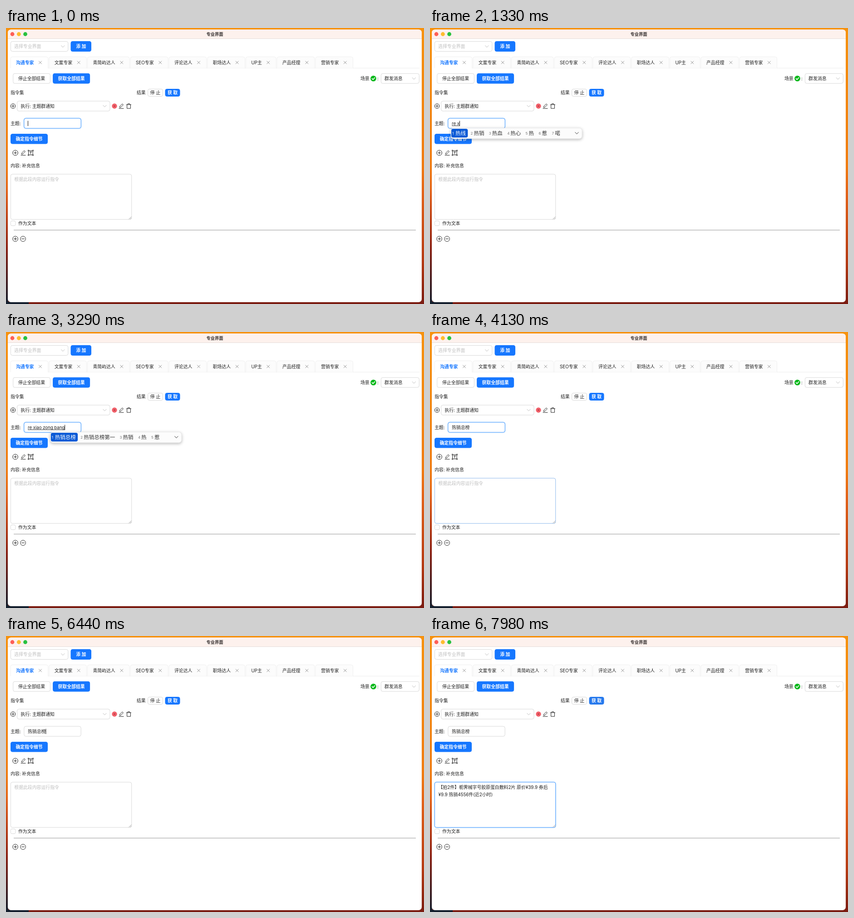
Recreate the animation shown at these times as an HTML page. Size 921x608 px, loop 8000 ms.

```html
<!DOCTYPE html>
<html lang="zh-CN">
<head>
<meta charset="utf-8">
<style>
  html, body { margin: 0; width: 100%; height: 100%; overflow: hidden; }
  svg { display: block; width: 921px; height: 608px; }
  text {
    font: 9.87px Inter, "Noto Sans CJK SC", "Noto Sans CJK", sans-serif;
    fill: #1f1f1f; white-space: pre; text-spacing-trim: space-all;
  }
  .bold { font-weight: 700; }
  .hint { fill: #bfbfbf; }
  .icon { fill: none; stroke: #222; stroke-width: 1; stroke-linecap: round; stroke-linejoin: round; }
</style>
</head>
<body>
<svg viewBox="0 0 921 608">
  <defs>
    <linearGradient id="wall" x2="0" y2="1">
      <stop offset="0" stop-color="#f6920f"/><stop offset=".5" stop-color="#f07c12"/>
      <stop offset=".6" stop-color="#e2621a"/><stop offset=".85" stop-color="#b43a14"/>
      <stop offset="1" stop-color="#7a1c12"/>
    </linearGradient>
    <linearGradient id="shade" x2="0" y2="1">
      <stop offset=".58" stop-color="#c33a14" stop-opacity="0"/>
      <stop offset=".8" stop-color="#8a2216"/><stop offset="1" stop-color="#15202e"/>
    </linearGradient>
    <filter id="shadow" x="-10%" y="-60%" width="120%" height="240%">
      <feDropShadow dx="0" dy="2" stdDeviation="3" flood-opacity=".3"/>
    </filter>
  </defs>
  <g id="page"></g>
  <g id="live"></g>
</svg>
<script>
const LOOP = 8000, TICK = 70, BLUE = '#1677ff', LINE = '#d9d9d9';
const $ = id => document.getElementById(id);

const box = (x, y, w, h, fill = '#fff', stroke = 'none', r = 4, extra = '') =>
  `<rect x="${x}" y="${y}" width="${w}" height="${h}" rx="${r}" fill="${fill}" stroke="${stroke}" ${extra}/>`;
const label = (x, middle, text, cls = '', extra = '') =>
  `<text x="${x}" y="${middle + 3.6}" class="${cls}" ${extra}>${text}</text>`;
const dot = (x, y, r, fill, stroke = 'none') =>
  `<circle cx="${x}" cy="${y}" r="${r}" fill="${fill}" stroke="${stroke}"/>`;
const icon = (x, y, d, extra = '') =>
  `<path class="icon" transform="translate(${x} ${y})" d="${d}" ${extra}/>`;
const chevron = (x, y, color = '#bfbfbf') => icon(x, y, 'M-3.6-1.8L0 2L3.6-1.8', `style="stroke:${color}"`);
const button = (x, y, w, h, text, primary) =>
  box(x, y, w, h, primary ? BLUE : '#fff', primary ? BLUE : LINE, 3.5) +
  label(x + w / 2, y + h / 2, text, primary ? 'bold' : '',
    `text-anchor="middle"${primary ? ' style="fill:#fff"' : ''}`);
const select = (x, y, w, h, text, cls) =>
  box(x, y, w, h, '#fff', LINE) + label(x + 7.8, y + h / 2, text, cls) + chevron(x + w - 11.5, y + h / 2);
const ring = (x, y, r, minus) =>
  dot(x, y, r, 'none', '#222') + icon(x, y, 'M-3 0H3' + (minus ? '' : 'M0-3V3'));
const pencil = (x, y) => icon(x, y, 'M-5 5.3H5M-3.6 2.7L-3 .2L2.2-5L4.4-2.8L-.8 2.3Z');

function tabs() {
  const names = ['沟通专家', '文案专家', '青简屿达人', 'SEO专家', '评论达人', '职场达人', 'UP主', '产品经理', '营销专家'];
  const lefts = [10, 94.7, 179.4, 274, 359, 443.7, 528.4, 597, 682, 766.5];
  return '<path d="M10 88.3H911" stroke="#eee"/>' + names.map((name, i) => {
    const x = lefts[i], right = lefts[i + 1] - 2, active = i === 0;
    return `<path d="M${x} 88.3V67.5q0-4 4-4H${right - 4}q4 0 4 4V88.3" fill="${active ? '#fff' : '#fcfcfc'}" stroke="#f0f0f0"/>` +
      (active ? `<path d="M${x + .5} 88.3H${right - .5}" stroke="#fff" stroke-width="1.4"/>` : '') +
      label(x + 12, 76, name, active ? 'bold' : '', active ? `style="fill:${BLUE}"` : '') +
      icon(right - 17.2, 76, 'M-3-3L3 3M3-3L-3 3', 'style="stroke:#888;stroke-width:.9"');
  }).join('');
}

$('page').innerHTML =
  box(0, 0, 921, 608, 'url(#wall)', 'none', 0) + box(0, 0, 5, 608, 'url(#shade)', 'none', 0) +
  box(0, 603, 50, 5, '#15202e', 'none', 0) +
  box(4, 3.5, 912, 600.5, '#fff', 'none', 7) +
  '<path id="bar" d="M4 23.5V10.5q0-7 7-7H909q7 0 7 7V23.5Z"/>' +
  '<path d="M4 23.5H916" stroke="#e6dcd9"/>' +
  [14, 28.3, 42.5].map(x => `<circle class="light" cx="${x}" cy="13.5" r="4.4"/>`).join('') +
  label(460, 13.5, '专业界面', 'bold', 'id="title" text-anchor="middle" style="font-size:9.3px"') +
  select(10.3, 29.5, 126.5, 22, '选择专业界面', 'hint') +
  button(143, 29.5, 44.5, 22, '添 加', true) + tabs() +
  button(15.7, 100.3, 81.6, 21.8, '停止全部结果') + button(103.6, 100.3, 81, 21.8, '获取全部结果', true) +
  label(781, 111, '场景') + dot(809.5, 111.2, 6.3, '#0ab81c') +
  icon(809.5, 111.2, 'M-3 .2L-.8 2.4L3.2-1.9', 'style="stroke:#fff;stroke-width:1.6"') + label(818, 111, ':') +
  select(826.3, 100.3, 84, 21.8, '群发消息', '') +
  label(10, 142, '指令集') + label(288, 142, '结果') +
  button(312.5, 134.5, 33, 16, '停 止') + `<g id="fetch">${button(351, 134.5, 32, 16, '获 取', true)}</g>` +
  ring(15.5, 172, 5.2) + select(24.5, 161, 204.5, 22, '执行: 主题群通知', '') +
  dot(239, 172, 5.7, '#f2616b') + icon(239, 172, 'M-1.7-1.7L1.7 1.7M1.7-1.7L-1.7 1.7', 'style="stroke:#a8323c"') +
  pencil(254, 172) +
  icon(270.5, 172, 'M-5-3.2H5M-2-3.4V-5.2H2V-3.4M-3.9-3V5.2H3.9V-3') +
  label(10, 210, '主题:') + button(10.5, 233.5, 81, 21.5, '确定指令细节', true) +
  ring(20.5, 275, 5.8) + pencil(38, 275) +
  icon(54.5, 275, 'M-4.5-4.5H4.5V4.5H-4.5ZM-2.2-2H2.2M0-2V2.6') +
  [-5, 5].map(x => [-5, 5].map(y => box(53.5 + x, 274 + y, 2, 2, '#fff', '#222', 0, 'stroke-width=".8"')).join('')).join('') +
  label(10, 303, '内容: 补充信息') +
  box(10.3, 425, 10.5, 10.5, '#fff', LINE, 2.8) + label(27, 430, '作为文本') +
  '<path d="M17 445.2H903" stroke="#b8b8b8" stroke-width="1.4"/>' +
  ring(20.5, 464.5, 5.8) + ring(37.5, 464.5, 5.8, true);

const field = (id, x, y, w, h) =>
  box(x - 1, y - 1, w + 2, h + 2, 'none', '#0591ff', 5, `id="${id}Glow" stroke-width="1.6"`) +
  box(x, y, w, h, '#fff', LINE, 4, `id="${id}"`);

$('live').innerHTML =
  field('topic', 39.8, 199, 125.4, 22) + label(48, 210, '', '', 'id="typed"') +
  '<path id="underline" stroke="#222" stroke-width=".9"/>' +
  field('area', 10.3, 322, 266.4, 99.7) + icon(274, 419, 'M-3 2L2-3M0 2L2 0', 'style="stroke:#777;stroke-width:.7"') +
  label(18.3, 333, '根据此段内容运行指令', 'hint', 'id="hint"') +
  `<g id="pasted">${label(18.5, 333, '【拍2件】栀霁械字号胶原蛋白敷料2片 原价¥39.9 券后')}${label(18.5, 349, '¥9.9 热销4556件(近2小时)')}</g>` +
  '<path id="caret" stroke="#111" stroke-width="1"/><g id="popup"></g>';

// start time, composed pinyin, left edge of the candidate window, candidates
const typing = [
  [210, 'r', 97.5, '人 让 如 日 然 热 入'],
  [560, 're', 43, '热 惹 喏 若 热爱 热点'],
  [980, 're', 46.3, '热 惹 喏 若 热爱 热点'],
  [1120, 're', 40, '热 惹 喏 若 热爱 热点'],
  [1330, 're x', 46, '热线 热销 热血 热心 热 惹 喏'],
  [1470, 're xi', 50, '热吸 热西 热系 热 惹 喏'],
  [1610, 're xia', 57, '热夏 热下 热 惹 喏'],
  [1680, 're xiao', 61.8, '热销 热孝 惹笑 热效应 热 惹 喏'],
  [2520, 're xiao z', 70, '热销中 热销 热 惹 喏'],
  [2590, 're xiao zo', 78, '热销中 热销 热 惹 喏'],
  [2730, 're xiao zon', 84, '热销中 热销总 热销 热 惹'],
  [2800, 're xiao zong', 84, '热销总 热销 热孝 热 惹'],
  [3010, 're xiao zong b', 90, '热销总部 热销总榜 热销 热 惹'],
  [3080, 're xiao zong ba', 97.8, '热销总把 热销总 热销 热 惹'],
  [3220, 're xiao zong ban', 97.8, '热销总办 热销总 热销 热 惹'],
  [3290, 're xiao zong bang', 97.8, '热销总榜 热销总榜第一 热销 热 惹'],
  [3570, '', 0, ''],
];

function popup(left, words) {
  if (!words) return '';
  let x = left + 3;
  const items = words.split(' ').map((word, i) => {
    const width = 11.5 * word.length, first = i === 0, color = first ? '#fff' : '#333';
    const item = (first ? box(x - 2, 222, width + 13.3, 19.3, '#0a5ad6') : '') +
      label(x, 231.6, i + 1, '', `style="font-size:8px;fill:${first ? '#fff' : '#777'}"`) +
      label(x + 7, 232, word, '', `style="font-size:11.5px;fill:${color}"`);
    x += width + 17.4;
    return item;
  });
  return box(left, 220.2, 289, 23.6, '#fcfcfc', '#d8d8d8', 6, 'filter="url(#shadow)" stroke-width=".6"') +
    items.join('') + chevron(left + 277.5, 231.5, '#333');
}

const ramp = (t, start, span = 210) => Math.max(0, Math.min(1, (t - start) / span));
const mix = (a, b, k) => `rgb(${a.map((v, i) => Math.round(v + (b[i] - v) * k))})`;
const set = (id, name, value) => $(id).setAttribute(name, value);
const show = (id, on) => $(id).style.display = on ? '' : 'none';
const within = (t, ...spans) => spans.some(([from, to]) => t >= from && t < to);
const GREY = [217, 217, 217], FOCUS = [64, 150, 255], PRIMARY = [22, 119, 255], PRESSED = [9, 88, 217];

function focusField(id, border, glow) {
  set(id, 'stroke', mix(GREY, FOCUS, border));
  set(id + 'Glow', 'opacity', glow * .14);
}

function render(t) {
  const active = !within(t, [4830, 6440]);
  set('bar', 'fill', active ? '#fdf1ed' : '#f1ebe8');
  $('title').style.fill = active ? '#3a3433' : '#a39c9a';
  document.querySelectorAll('.light').forEach((light, i) => {
    light.setAttribute('fill', active ? ['#fe5f57', '#febc2e', '#28c13f'][i] : '#d8d1ce');
    light.setAttribute('stroke', active ? 'none' : '#bfb8b5');
    light.setAttribute('stroke-width', .6);
  });

  const [, pinyin, left, words] = typing.findLast(step => t >= step[0]) || [0, '', 0, ''];
  const committed = t >= 3500;
  $('typed').textContent = committed ? '热销总榜' : pinyin;
  $('typed').style.fontSize = committed ? '' : '9.6px';
  const end = 48 + (committed || pinyin ? $('typed').getComputedTextLength() : 0);
  set('underline', 'd', !committed && pinyin ? `M48 215.3H${end}` : '');
  $('popup').innerHTML = popup(left, words);
  set('popup', 'opacity', committed ? .4 : 1);

  const topic = t < 6440 ? 1 - ramp(t, 4760) : ramp(t, 6440) - ramp(t, 6650);
  const area = ramp(t, 6650);
  const hover = ramp(t, 3990, 280) - ramp(t, 4760);
  focusField('topic', topic, topic);
  focusField('area', Math.max(area, hover), area);
  show('hint', t < 7000);
  show('pasted', t >= 7000);

  let caret = '';
  if (within(t, [0, 2240], [2520, 4060], [4620, 4830], [6440, 6720])) caret = `M${end + .4} 204.5V216`;
  else if (within(t, [6720, 7000])) caret = 'M19 327.5V339';
  else if (within(t, [7000, 7490])) caret = 'M138.5 343V354';
  set('caret', 'd', caret);

  const fill = t < 7910 ? mix(PRIMARY, FOCUS, ramp(t, 7420, 280)) : mix(FOCUS, PRESSED, ramp(t, 7840, 300));
  const face = $('fetch').firstChild;
  face.setAttribute('fill', fill);
  face.setAttribute('stroke', fill);
}

let last = -1;
function frame() {
  const t = Math.floor(performance.now() % LOOP / TICK) * TICK;
  if (t !== last) render(last = t);
  requestAnimationFrame(frame);
}
frame();
</script>
</body>
</html>
```
